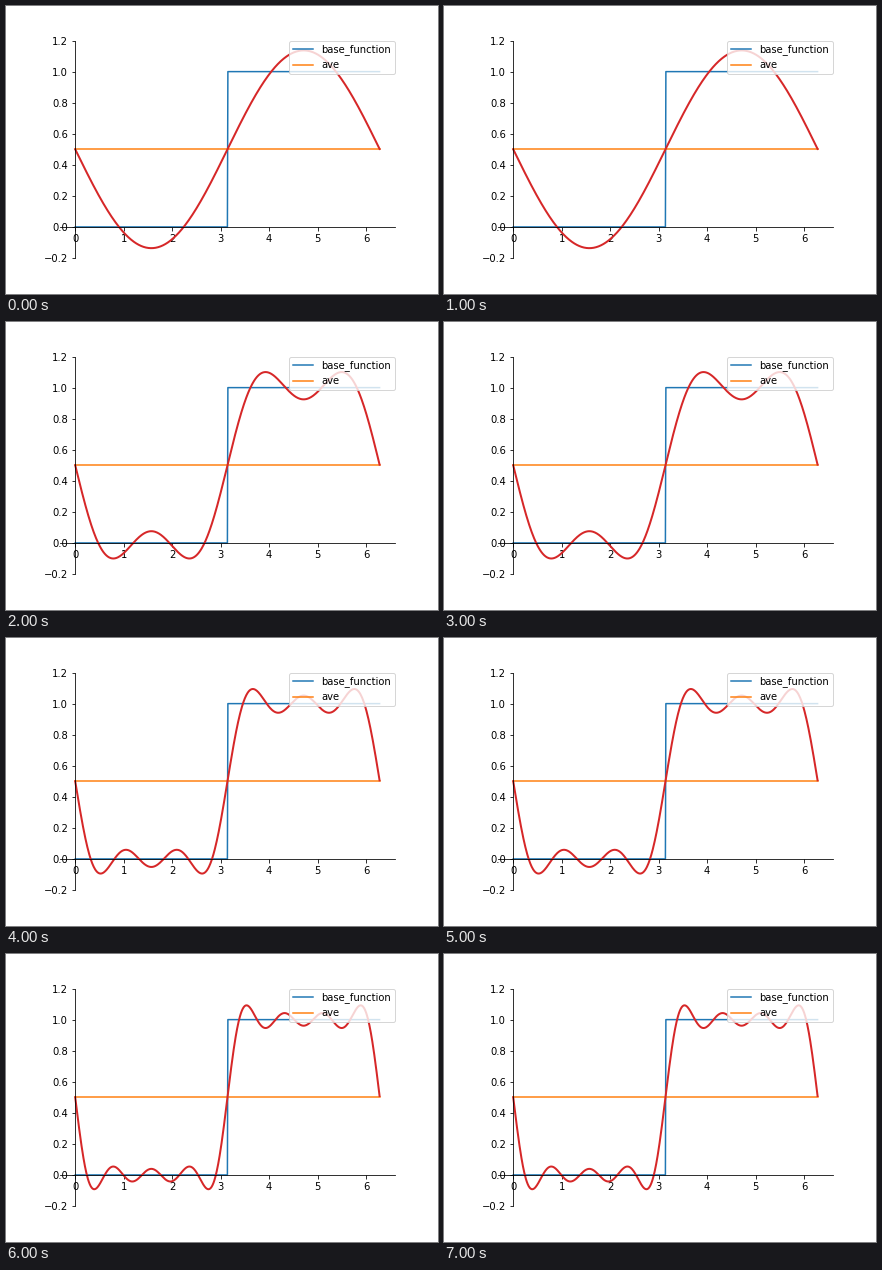
These frames come from a looping animation (432x288 px, 8000 ms). A matplotlib script:

```python
import numpy as np
import matplotlib.pyplot as plt
from matplotlib.animation import FuncAnimation

plt.rcParams["font.family"] = "DejaVu Sans"
plt.rcParams["font.size"] = 10

FRAMES = 8
x = np.arange(0, 2 * np.pi, 0.01)


def partial_sum(order):
    """Fourier sum of the step function up to the given harmonic."""
    y = np.full_like(x, 0.5)
    for k in range(1, order + 1, 2):
        y -= 2 / (np.pi * k) * np.sin(k * x)
    return y


fig, ax = plt.subplots(figsize=(6, 4), dpi=72)
fig.subplots_adjust(left=0.125, right=0.9, bottom=0.125, top=0.88)

ax.plot(x, np.where(x < np.pi, 0, 1), color="tab:blue", label="base_function")
ax.plot(x, np.full_like(x, 0.5), color="tab:orange", label="ave")
curve, = ax.plot(x, partial_sum(1), color="tab:red", linewidth=2)

ax.margins(x=0.05)
ax.set_ylim(-0.2, 1.2)
ax.set_xticks(range(7))
ax.set_yticks(np.linspace(-0.2, 1.2, 8))
for side in ("top", "right"):
    ax.spines[side].set_visible(False)
for side in ("left", "bottom"):
    ax.spines[side].set_position(("data", 0))

ax.legend(loc="upper right", bbox_to_anchor=(1, 1), borderaxespad=0)


def update(i):
    curve.set_ydata(partial_sum(i + 1))
    return curve,


anim = FuncAnimation(fig, update, frames=FRAMES, interval=1000, repeat=True)
plt.show()
```
